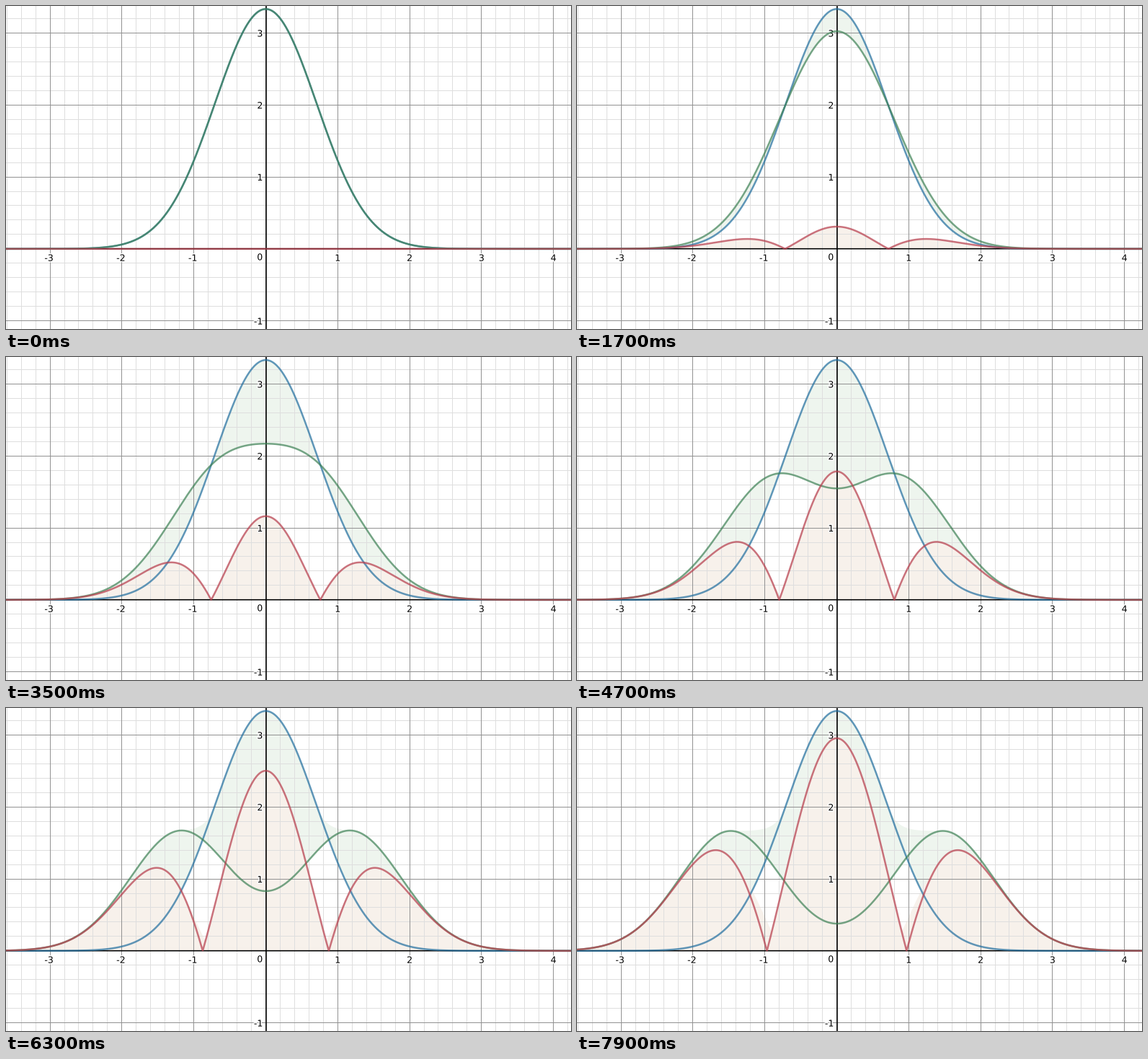
Write a matplotlib script that moves like this. It is 784 px wide and 448 px high and loops after 8000 ms.

```python
import numpy as np
import matplotlib.pyplot as plt
import matplotlib.patheffects as pe
from matplotlib.animation import FuncAnimation
from matplotlib.patches import Polygon

W, H, DPI = 784, 448, 100
PT = 72 / DPI
UNIT, X0, Y0 = 99.8, 360.45, 336.85
FRAMES, STEP = 80, 100
PEAK = 10 / 3
BLUE, GREEN, RED = "#2470a0", "#3c8054", "#b8404f"
GREEN_TINT, RED_TINT = "#eef5ee", "#f7f1eb"

fig = plt.figure(figsize=(W / DPI, H / DPI), dpi=DPI, facecolor="white")
ax = fig.add_axes([0, 0, 1, 1])
ax.set_xlim(-X0 / UNIT, (W - X0) / UNIT)
ax.set_ylim((Y0 - H) / UNIT, Y0 / UNIT)
ax.axis("off")


def data(px, py):
    return (px - X0) / UNIT, (Y0 - py) / UNIT


def rule(px, py, color, width, z):
    x, y = data(px, py)
    style = dict(color=color, lw=width * PT, zorder=z, snap=False)
    ax.axvline(x, **style)
    ax.axhline(y, **style)


def grid(step, color, z):
    # Each line fills one whole pixel row or column.
    for k in np.arange(-5, 5 + step / 2, step):
        rule(np.floor(X0 + k * UNIT) + 0.5, np.floor(Y0 - k * UNIT) + 0.5,
             color, 1, z)


def label(text, px, base, align="center"):
    ax.text(*data(px, base), text, ha=align, va="baseline",
            family="DejaVu Sans", size=12.5 * PT, color="black", zorder=4,
            clip_on=True,
            path_effects=[pe.withStroke(linewidth=3 * PT, foreground="white")])


grid(0.2, "#dedede", 1)
grid(1, "#929292", 2)
rule(361, 336.7, "black", 1.6, 3)

for n in (-3, -2, -1, 1, 2, 3, 4):
    label(str(n), X0 + n * UNIT - (1.5 if n < 0 else 0), 353.7)
for n in (-1, 1, 2, 3):
    label(str(n), 356.3, Y0 - n * UNIT + 5, "right")
label("0", 356.3, 352.5, "right")

# Two bells drift apart; the shading keeps every area already swept.
x = np.linspace(-3.7, 4.3, 1601)
t = np.arange(FRAMES) * STEP / 1000
shift = np.interp(t, [0, 1.7, 2.6, 3.5, 4.7, 6.3, 7.9],
                  [0, 0.312, 0.476, 0.655, 0.8755, 1.179, 1.475])[:, None]
bell = PEAK * np.exp(-x**2)
mean = PEAK / 2 * (np.exp(-(x - shift)**2) + np.exp(-(x + shift)**2))
gap = np.abs(mean - bell)
upper = np.maximum.accumulate(np.maximum(mean, bell))
lower = np.minimum.accumulate(np.minimum(mean, bell))
swept = np.maximum.accumulate(gap)


def area(color, z):
    return ax.add_patch(Polygon([[0, 0], [0, 0]], fc=color, ec="none", lw=0,
                                zorder=z))


def curve(color, alpha, z):
    return ax.plot(x, bell, color=color, alpha=alpha, lw=2.5 * PT, zorder=z)[0]


def band(low, high):
    return np.column_stack([np.r_[x, x[::-1]], np.r_[low, high[::-1]]])


mean_area, gap_area = area(GREEN_TINT, 0.5), area(RED_TINT, 0.6)
curve(BLUE, 0.72, 6)
mean_line = curve(GREEN, 0.7, 7)
gap_line = curve(RED, 0.73, 8)


def draw(i):
    mean_area.set_xy(band(lower[i], upper[i]))
    gap_area.set_xy(band(0 * x, swept[i]))
    mean_line.set_ydata(mean[i])
    gap_line.set_ydata(gap[i])
    return mean_area, gap_area, mean_line, gap_line


anim = FuncAnimation(fig, draw, frames=FRAMES, interval=STEP, repeat=True,
                     repeat_delay=0, blit=False)
plt.show()
```
